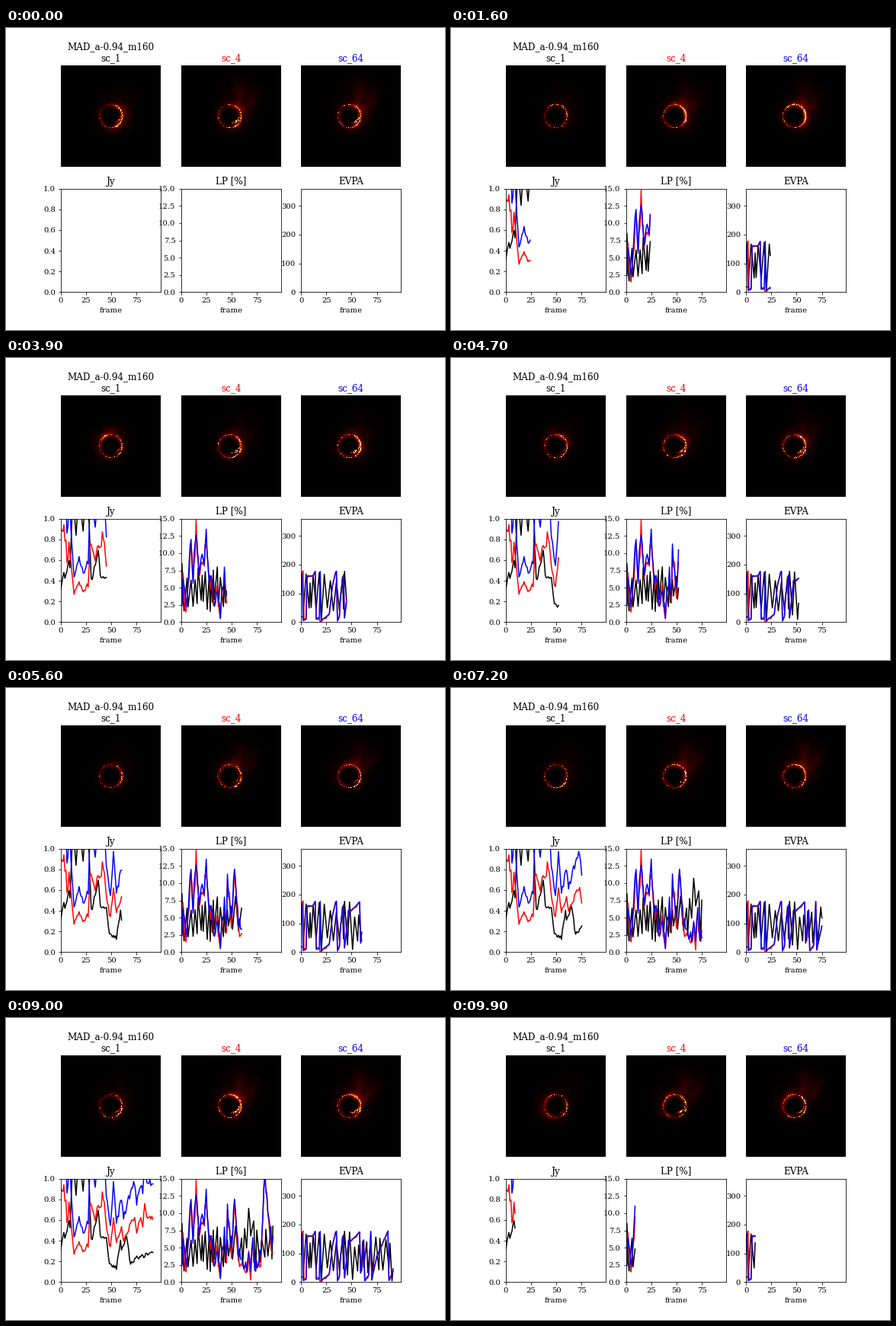
These frames come from a looping animation (576 px wide and 396 px high, 10000 ms). A matplotlib script:

```python
import matplotlib.pyplot as plt
import numpy as np
from matplotlib.animation import FuncAnimation

STEPS, N = 100, 160
COLORS = ["k", "r", "b"]
T = np.arange(STEPS)
plt.rcParams["font.family"] = "DejaVu Serif"


def bump(d, width):
    return np.exp(-0.5 * (d / width) ** 2)


def path(points):
    return np.interp(T, *zip(*points))


def jitter(size, seed):
    return np.random.default_rng(seed).normal(0, size, STEPS)


def zigzag(low, high, seed):
    """Seeded turning points, by turns in the lower and the upper part."""
    rng = np.random.default_rng(seed)
    t = np.cumsum(rng.integers(1, 4, STEPS))
    frac = rng.uniform(0, 0.35, STEPS)
    frac[1::2] = 1 - frac[1::2]
    return np.interp(T, t, low + (high - low) * frac)


# Light curves: the two slower ones follow each other closely
flux = path([(0, .90), (2, .88), (3, .97), (4, .76), (5, .78), (6, .58), (7, .60),
             (8, .77), (10, .57), (13, .28), (18, .39), (22, .29), (27, .36),
             (29, .78), (34, .59), (36, .73), (40, .73), (41, .85), (43, .78),
             (45, .53), (49, .33), (52, .62), (55, .37), (60, .53), (62, .40),
             (69, .57), (73, .62), (75, .49), (79, .62), (81, .54), (83, .76),
             (85, .63), (99, .60)])
fast_flux = path([(0, .31), (3, .50), (4, .41), (8, .59), (9, .52), (12, 1.25),
                  (15, .83), (18, 1.3), (22, .86), (25, 1.3), (28, .95), (30, .39),
                  (35, .58), (37, .72), (39, .45), (45, .43), (48, .17), (55, .14),
                  (59, .41), (60, .31), (65, .45), (69, .17), (75, .24), (85, .27),
                  (99, .30)])
linear = path([(0, 7), (1, 3), (2, 6.3), (5, 1.8), (10, 11.5), (12, 6), (15, 13.5),
               (18, 7), (20, 9.5), (23, 8.5), (25, 12.6), (28, 6), (30, 7),
               (33, 2.2), (36, 5), (39, 1), (43, 7.5), (45, 3.5), (46, 11),
               (50, 4), (53, 12.5), (57, 3), (65, 1.5), (67, 4), (69, 1.5),
               (71, 6), (73, 2), (79, 4), (83, 16), (85, 12), (90, 5), (99, 8)])
# The angle turns on and on and is shown modulo 180 degrees
angle = path([(0, 95), (1, 168), (2, 186), (5, 190), (6, 338), (12, 342),
              (14, 357), (15, 370), (18, 372), (19, 357), (20, 366), (28, 388),
              (31, 485), (34, 530), (38, 560), (39, 630), (42, 705), (43, 735),
              (45, 790), (47, 865), (50, 865), (58, 895), (60, 968), (63, 1085),
              (67, 1105), (69, 1257), (70, 1270), (75, 1350), (85, 1430),
              (99, 1540)])

fast_linear = (zigzag(1.3, 8.5, 5) + 7 * bump(T - 1, 0.7)
               + 5 * bump(T - 68, 2.5))

# title, upper limit, y ticks, series
PLOTS = [
    ("Jy", 1, np.arange(0, 1.1, 0.2),
     [fast_flux + jitter(.015, 1), flux + jitter(.012, 2),
      1.5 * flux + .03 + jitter(.02, 3)]),
    ("LP [%]", 15, np.arange(0, 15.1, 2.5),
     [fast_linear, abs(linear - .3 + jitter(.7, 4)),
      abs(linear + .3 + jitter(.7, 5))]),
    ("EVPA", 360, np.arange(0, 301, 100),
     [zigzag(2, 178, 9), (angle + jitter(3, 6)) % 180, angle % 180]),
]

# Ring light: hot spot angle, glow angle and glow strength at a few steps
KEYS = [0, 9, 24, 45, 60, 75, 85]
FAST = dict(hot=[-10, 15, 40, -25, 0, -55, -20],
            glow=[-5, 185, 20, 110, 20, 0, 5],
            light=[.42, .22, .10, .36, .12, .10, .16], plume=0.25, streak=0.4)
SLOW = dict(hot=[-30, 15, 20, -15, -35, 20, 15],
            glow=[10, 130, 28, 25, 70, 50, 45],
            light=[.24, .18, .36, .24, .18, .20, .26], plume=1, streak=1)

# title, look, centre, gain
RINGS = [("MAD_a-0.94_m160\nsc_1", FAST, 0.0, 0.85),
         ("sc_4", SLOW, -0.03, 1.0),
         ("sc_64", SLOW, -0.03, 1.05)]

axis = (np.arange(N) + 0.5) / N * 2 - 1
X, Y = np.meshgrid(axis, axis)


def ring_image(panel, n):
    _, look, dx, gain = RINGS[panel]
    hot, glow, light = (np.interp(n, KEYS, look[k]) for k in ("hot", "glow", "light"))
    plume = look["plume"] * (0.02 + 0.08 * abs(np.cos(np.pi * n / 85)))
    streak = look["streak"] * (0.3 + 0.3 * np.cos(2 * np.pi * n / 45))
    rng = np.random.default_rng(1000 * panel + n)
    x = X - dx
    r, th = np.hypot(x, Y), np.arctan2(Y, x)
    deg = np.degrees(th)

    def around(mid, width):
        return bump((deg - mid + 180) % 360 - 180, width)

    swirl = (0.7 + 0.2 * np.sin(3 * th + 20 * r - 0.35 * n)
             + 0.1 * np.sin(5 * th - 30 * r + 0.5 * n + 1))
    speck = rng.gamma(1.0, 0.9, (N, N))
    ring = bump(r - 0.23, 0.009) * (0.18 + 0.45 * around(hot, 45)) * speck
    inner = bump(r - 0.19, 0.02) * 0.08 * swirl
    inner += (bump(r - 0.165 - 0.0009 * (deg + 40), 0.014)
              * around(-38, 24) * streak * speck)
    fall = np.where(r > 0.225, np.exp(-(r - 0.225) / 0.085), bump(r - 0.225, 0.025))
    haze = fall * swirl * (0.08 + light * around(glow, 55))
    trail = (plume * bump(r - 0.45, 0.2) * around(52 + 25 * (r - 0.5), 24)
             * (0.75 + 0.25 * np.sin(9 * th - 6 * r)))
    return np.clip(gain * (ring + inner + haze + trail), 0, 1)


def step_at(i):
    """Steps run in name order: 0, 10-19, 1, 20-29, 2, ..."""
    if i == 0:
        return 0
    tens, unit = divmod(i - 1, 11)
    return 10 * (tens + 1) + unit if unit < 10 else tens + 1


fig, axes = plt.subplots(2, 3, figsize=(8, 5.5), dpi=72)
fig.subplots_adjust(left=0.125, right=0.9, bottom=0.125, top=0.88,
                    wspace=0.2, hspace=0.2)

images, lines = [], []
for ax, (title, *_), color in zip(axes[0], RINGS, COLORS):
    images.append(ax.imshow(np.zeros((N, N)), cmap="afmhot", vmin=0, vmax=1,
                            origin="lower", interpolation="nearest",
                            extent=(0, 130.9, 0, 132.9)))
    ax.set(xlim=(0, 131.29), ylim=(0, 132.9))
    ax.set_title(title, color=color, fontsize=12)
    ax.axis("off")

for ax, (title, top, ticks, series) in zip(axes[1], PLOTS):
    ax.set_title(title, fontsize=12)
    ax.set(xlim=(0, STEPS - 1), ylim=(0, top), xlabel="frame",
           xticks=[0, 25, 50, 75], yticks=ticks)
    for vals, color in zip(series, COLORS):
        lines.append((ax.plot([], [], color=color, lw=1.5)[0], vals))


def update(i):
    n = step_at(i)
    for k, im in enumerate(images):
        im.set_data(ring_image(k, n))
    for line, vals in lines:
        line.set_data(T[:n + 1], vals[:n + 1])
    return images + [line for line, _ in lines]


anim = FuncAnimation(fig, update, frames=STEPS, interval=100,
                     repeat=True, repeat_delay=0, blit=False)
plt.show()
```
